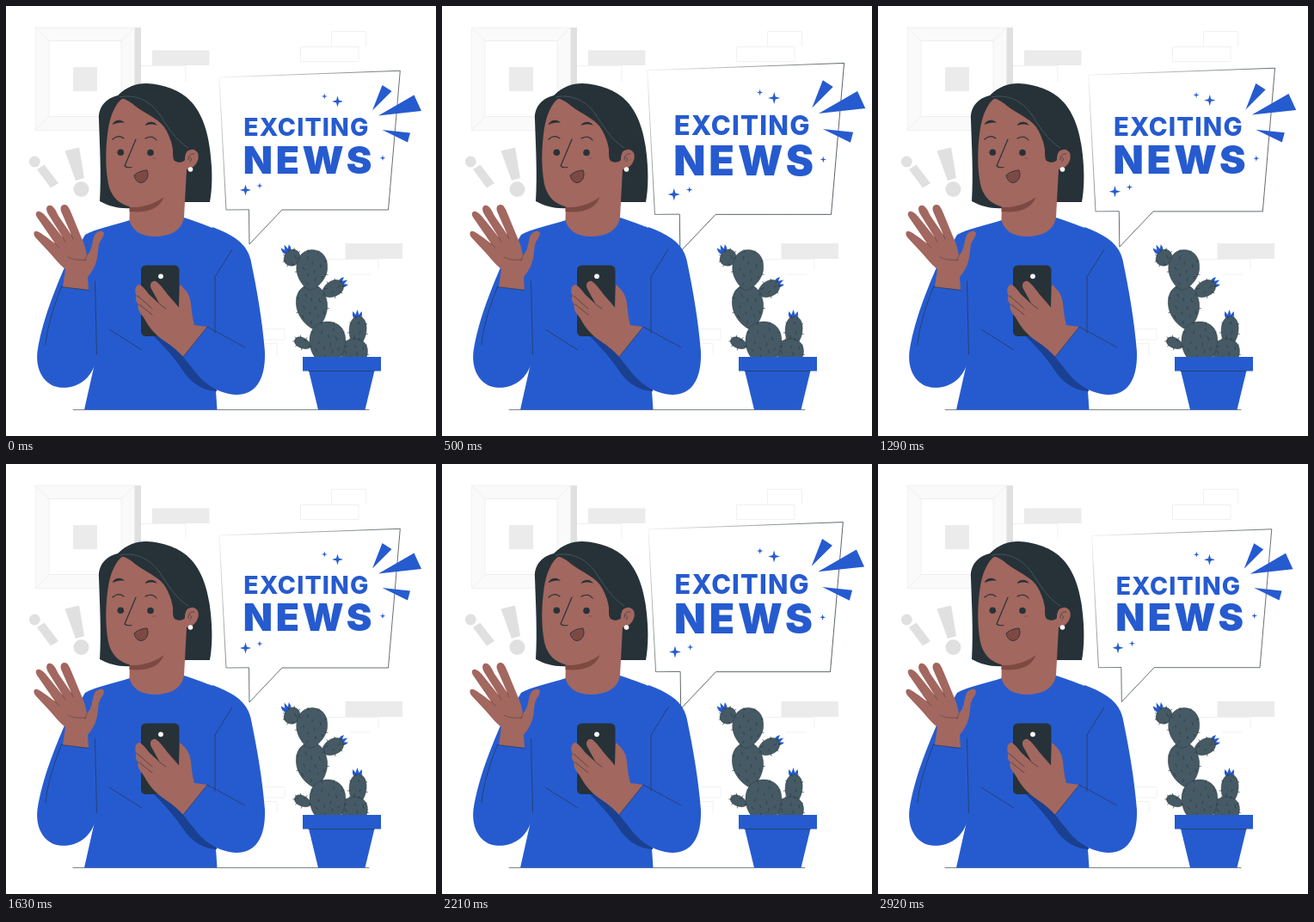
An HTML page for the animation above (2960 ms loop, 500 by 500 pixels).

```html
<!DOCTYPE html>
<html lang="en">
<head>
<meta charset="utf-8">
<title>Exciting news</title>
<style>
  html, body { margin: 0; width: 100%; height: 100%; overflow: hidden; background: #fff; }
  svg { display: block; width: 100vw; height: 100vh; }
  .blue { fill: #265bcf; }
  .shade { fill: #1a4091; }
  .skin { fill: #a2675f; }
  .dark { fill: #263238; }
  .line { fill: none; stroke: #263238; stroke-width: .6; stroke-linecap: round; stroke-linejoin: round; }
  .wall { fill: none; stroke: #e8e8e8; stroke-width: .6; }
  .pulse { transform-box: view-box; }
  text { font-family: Montserrat, Inter, "Open Sans", sans-serif; }
</style>
</head>
<body>
<svg viewBox="0 0 500 500" xmlns="http://www.w3.org/2000/svg">
  <defs>
    <linearGradient id="edge" gradientUnits="userSpaceOnUse" x1="248" y1="85" x2="348" y2="185">
      <stop offset="0" stop-color="#eee"/>
      <stop offset="1" stop-color="#263238"/>
    </linearGradient>
  </defs>

  <!-- Wall -->
  <rect x="149" y="25" width="8" height="119" fill="#e0e0e0"/>
  <rect x="34.5" y="25" width="115" height="119.5" fill="#fafafa" stroke="#ebebeb" stroke-width=".6"/>
  <path d="M34.5 25L50 40.5M149.5 25L134 40.5M34.5 144.5L50 128.5" class="wall"/>
  <rect x="50" y="40.5" width="84" height="88" fill="#fff" stroke="#e6e6e6" stroke-width=".6"/>
  <rect x="78" y="71" width="28" height="28" fill="#ebebeb"/>
  <rect x="170" y="51.5" width="66.5" height="17.5" fill="#ebebeb"/>
  <rect x="394.5" y="276" width="66.5" height="18" fill="#ebebeb"/>
  <path class="wall" d="M157 69.5H209V88M378.5 47V29.5H418.5V47M342.5 47.5H410V64.5H342.5ZM375 294.5H433V307M400 312H424M300 375.5H324V388H300M300 392.5H315V406"/>

  <!-- Exclamation marks -->
  <g fill="#e0e0e0">
    <circle cx="33.3" cy="181" r="6.4"/>
    <path d="M36 190L44.500 184.500L61 206L52 211.500Z"/>
    <path d="M68.5 168.5L85 164.5L91 200L81 203Z"/>
    <circle cx="87.5" cy="213" r="9"/>
  </g>

  <path class="line" d="M78 469.5H422"/>

  <!-- Plant -->
  <g id="cactus"></g>
  <path class="blue" d="M352 424H428.500L417.500 469.500H363Z"/>
  <rect class="blue" x="345" y="408" width="91" height="16.5"/>
  <path class="line" d="M352 424.5H428"/>

  <!-- Speech bubble: each part pulses around its own centre -->
  <path class="pulse" transform-origin="353 176" d="M248 83L458.300 75.300L444.500 237H321L283 277L282.500 236.800L256 237Z" fill="#fff" stroke="url(#edge)" stroke-width=".7"/>
  <g class="blue pulse" transform-origin="351 163">
    <text x="276.3" y="151.5" font-size="28.5" font-weight="800" letter-spacing="1.1">EXCITING</text>
    <text x="275.8" y="194.500" font-size="44.5" font-weight="900" letter-spacing="3.6">NEWS</text>
  </g>
  <g class="blue pulse" transform-origin="377.5 156">
    <path d="M437.500 92L448.500 99L426 121.500ZM433 127.500L474.500 103.500L483 122ZM437.500 144L470 147.500L467 158.500Z"/>
    <g id="stars"></g>
  </g>

  <!-- Hair behind the head -->
  <path class="dark" d="M108 132C107 117 117 107 130 104C140 94 151 90 163 90C183 91 202 97 215 111C230 127 237 152 239 186C240 203 239 217 237 228H200L146 235C132 236 120 233 109 227C111 196 109 164 108 132Z"/>

  <!-- Torso -->
  <path class="blue" d="M144 249C125 255 104 259 92 266C82 282 76 306 76 330L96 340L105 407L91 469.5H245.500L244 447L243 380L262 300L262 268C245 259 225 252 207 246Z"/>
  <path class="shade" d="M168 380C182 394 194 407 203 420C213 436 226 447 245 448V426L206 390Z"/>
  <!-- Far arm -->
  <path class="blue" d="M68 304C57 330 42 366 36.500 402C34 424 45 441 62 443.500C82 446 103 433 105.500 406L104 318L96 330Z"/>
  <!-- Near arm -->
  <path class="blue" d="M240 257C264 266 280 276 284.500 295C292 331 298 365 301 402C302 436 289 452 268 452C248 451 232 440 222 428L206 408L234 373L243 379V310Z"/>

  <!-- Neck -->
  <path class="skin" d="M144 228L207 180L210 190L207 246C204 262 190 268 173 268C156 268 146 260 143.500 249Z"/>
  <path d="M143.500 234C160 234 173 230 183.500 222C179 236 164 241 143.500 239Z" fill="#7d4a43"/>
  <!-- Face -->
  <path class="skin" d="M136 107C127 113 121 128 118.500 145C116 164 115 185 119 207C123 224 134 232 148 234C168 234 189 222 199 204L210 190V166L192 145L168 124Z"/>
  <path class="skin" d="M208 171C211 165 220 165 223 171C226 179 219 189 211 190L207 188Z"/>
  <path class="line" d="M212 179C212 173 216 171 219 172M214 181C216 179 216 177 214 176"/>
  <circle cx="214.5" cy="190" r="2.8" fill="#fff"/>
  <!-- Hair in front, with the lock by the ear -->
  <path class="dark" d="M132 108C140 106 147 114 154 119C166 127 180 133 186 144C191 153 193 160 194 167C194 173 194 178 196 180C200 183 206 182 208 179C208 174 209 170 212 168L222 165L214 118L165 94L137 99Z"/>
  <path d="M132 106C150 102 167 110 178 125C187 139 198 157 212 165" fill="none" stroke="#455a64" stroke-width=".9"/>
  <!-- Features -->
  <g class="dark">
    <path d="M124 137C127 132 134 131 138 136C133 135 128 136 124 138ZM162 138C166 133 173 134 176 139C171 137 167 137 162 139Z"/>
    <circle cx="133.3" cy="170.3" r="3.8"/>
    <circle cx="168" cy="170.5" r="3.8"/>
  </g>
  <path class="line" style="stroke-width:1.2" d="M124 155C128 151 133 151 137 154M162 154C167 151 172 152 175 156M151 155L138 186C140 188 143 188 146 187.500"/>
  <path class="line" d="M170 177H174" opacity=".5"/>
  <path d="M149 197C152 194 158 191 164 191C167 198 163 205 157 205.500C152 205 150 201 149 197Z" fill="#7d4a43" stroke="#263238" stroke-width=".9"/>

  <!-- Raised hand -->
  <path class="skin" d="M66 327L69 306C61 300 55 291 49 285L35 270C31 266 32 261 36 262C40 263 46 268 57 276L37 247C33 242 35 238 39 239C43 240 47 245 50 249L66 269L49 242C45 235 48 231 52 232C56 233 58 238 61 244L76 266L65 241C62 235 64 231 68 231C72 231 74 236 76 241L88 270C92 278 93 285 94 290C100 284 100 276 102 269C104 263 109 261 112 262C115 263 114 266 112 270C106 277 108 285 106 293C104 303 100 309 95 315L96 330Z"/>
  <path class="line" opacity=".65" d="M72 292C78 295 85 296 93 295M94 290L92 296M57 276L62 281M66 269L69 274M76 266L78 271"/>

  <!-- Phone and hand -->
  <rect class="dark" x="157" y="301.5" width="44.5" height="82.5" rx="5.5"/>
  <circle cx="180" cy="314.3" r="2.9" fill="#fff"/>
  <path class="skin" d="M202 324C211 331 214 337 215 346C216 356 217 363 219 371L234 373L206 408C198 399 191 394 182 388C172 381 166 373 160 362C155 356 152 351 154 347C151 344 150 340 152 337C149 332 150 326 154 324C158 324 162 330 167 336L179 347L169 329C166 323 170 319 174 320C179 323 183 329 187 334L201 350Z"/>
  <path class="line" d="M153 337L170 352M155 347L170 359M179 347L186 352M187 334L201 350"/>

  <!-- Folds -->
  <path class="line" d="M64.500 326.500L96 330.500M64.500 326.500C56 348 48 372 46 394M103.500 320L105.500 405M120 376L158 400M263 283L243 315V380M206 408L234 373L278 397"/>
</svg>

<script>
  const loop = 2960;
  // Time in ms and scale
  const beat = [
    [0, 1], [500, 1.088], [600, 1.09], [920, 1.066], [1080, 1.05], [1630, 1],
    [2000, 1.047], [2170, 1.071], [2315, 1.09], [2460, 1.071], [2710, 1.03],
    [2920, 0.995], [2960, 1]
  ];
  const byId = id => document.getElementById(id);

  function star(x, y, r) {
    const k = r * 0.22;
    return `<path d="M${x} ${y - r}L${x + k} ${y - k}L${x + r} ${y}L${x + k} ${y + k}` +
      `L${x} ${y + r}L${x - k} ${y + k}L${x - r} ${y}L${x - k} ${y - k}Z"/>`;
  }

  let seed = 7;
  function random() {
    seed = (seed * 16807) % 2147483647;
    return seed / 2147483647;
  }

  // One cactus pad with spines; a small taper value narrows its base
  function pad(x, y, rx, ry, turn = 0, taper = 0.55) {
    const half = s => `C${s * rx * taper} ${ry} ${s * rx} ${ry * 0.45} ${s * rx} ${-ry * 0.1}` +
      `C${s * rx} ${-ry * 0.7} ${s * rx * 0.55} ${-ry} 0 ${-ry}`;
    let spines = '';
    const inner = Math.round(rx * ry / 45);
    for (let i = 0; i < inner; i++) {
      const a = i * 2.4, d = Math.sqrt((i + 0.5) / inner) * 0.8;
      spines += `M${rx * d * Math.cos(a)} ${ry * d * Math.sin(a)}l${random() * 3 - 1.5} ${2 + random() * 2}`;
    }
    for (let i = 0; i < 6; i++) {
      const a = Math.PI * (0.95 + i * 0.22);
      const c = Math.cos(a), s = Math.sin(a);
      spines += `M${rx * 0.93 * c} ${ry * 0.93 * s}l${2.5 * c} ${2.5 * s}`;
    }
    return `<g transform="translate(${x} ${y}) rotate(${turn})">` +
      `<path d="M0 ${ry}${half(-1)}M0 ${ry}${half(1)}" fill="#455a64" stroke="#263238" stroke-width=".4"/>` +
      `<path class="line" d="${spines}"/></g>`;
  }

  function flower(x, y, turn) {
    return `<path class="blue" transform="translate(${x} ${y}) rotate(${turn})" ` +
      `d="M-2 6C-6 3 -6 -1 -5 -4L-2 0L0 -6L2 0L5 -4C6 -1 6 3 2 6Z"/>`;
  }

  byId('stars').innerHTML =
    star(385.5, 111, 6.5) + star(370.3, 105, 3.4) + star(438, 176.7, 3.4) +
    star(278.5, 214, 6.5) + star(295, 209, 3.4);

  byId('cactus').innerHTML =
    flower(326, 283, -25) + flower(392, 321.5, 60) + flower(408.5, 359, 0) +
    pad(333, 293, 10, 9, -50) +
    pad(380, 329, 9, 13, 62) +
    pad(356, 350, 18, 26, -8, 0.3) +
    pad(355.5, 307, 18, 23.5, 5, 0.3) +
    pad(345, 392, 6, 10, -65) +
    pad(409, 378, 10, 17, 4) +
    pad(405, 403, 15.5, 16) +
    pad(374, 392, 21, 25);

  function scaleAt(t) {
    const i = beat.findIndex(p => p[0] > t);
    const [t0, s0] = beat[i - 1], [t1, s1] = beat[i];
    return s0 + (s1 - s0) * (t - t0) / (t1 - t0);
  }

  const parts = document.querySelectorAll('.pulse');
  const start = performance.now();
  function draw() {
    const s = scaleAt(Math.max(0, performance.now() - start) % loop);
    for (const part of parts) part.style.transform = `scale(${s})`;
    requestAnimationFrame(draw);
  }
  draw();
</script>
</body>
</html>
```
